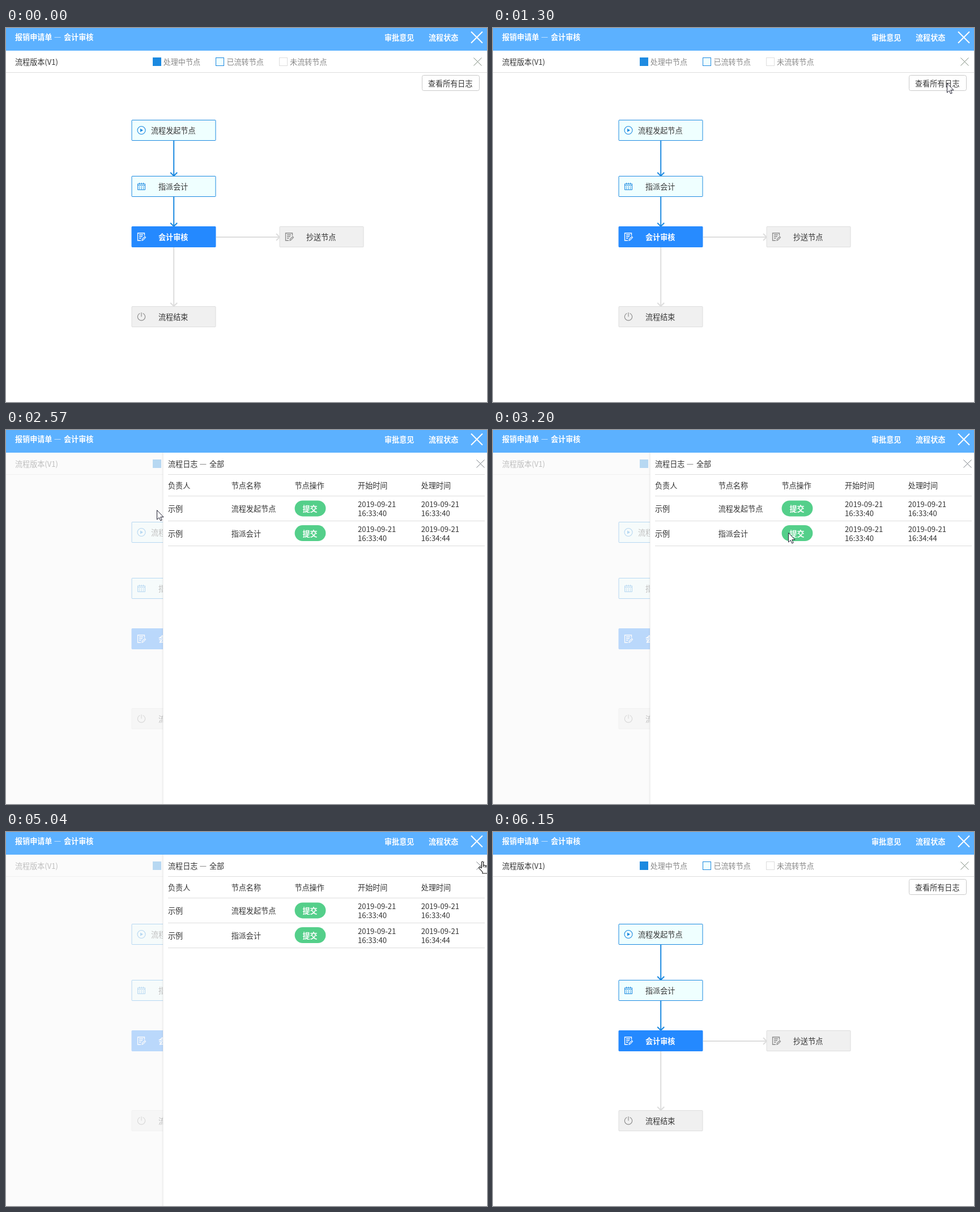
An HTML page for the animation above (6620 ms loop, 849 by 660 pixels).

```html
<!DOCTYPE html>
<html lang="zh">
<head>
<meta charset="utf-8">
<style>
html, body { margin: 0; width: 100%; height: 100%; overflow: hidden; background: #fff; }
svg { display: block; width: 849px; height: 660px; }
text { font: 13.1px "Noto Sans CJK SC", "Noto Sans CJK", sans-serif; white-space: pre; }
</style>
</head>
<body>
<svg id="stage" viewBox="0 0 849 660" fill="none"></svg>
<script>
const LOOP = 6620, OPEN_X = 277, TRAVEL = 572, COL = 111.7;
const BLUE = '#1b89e0', GREY = '#ddd', INK = '#333';
const stage = document.getElementById('stage');

function add(parent, tag, attrs, content) {
  const el = document.createElementNS('http://www.w3.org/2000/svg', tag);
  for (const k in attrs) el.setAttribute(k, attrs[k]);
  if (content) el.textContent = content;
  parent.appendChild(el);
  return el;
}
const group = (p, attrs = {}) => add(p, 'g', attrs);
const rect = (p, x, y, width, height, attrs) => add(p, 'rect', { x, y, width, height, ...attrs });
const path = (p, d, stroke, width = 1, more = {}) =>
  add(p, 'path', { d, stroke, 'stroke-width': width, ...more });
// cy is the vertical middle of the glyphs; white text is bold
const label = (p, x, cy, s, fill = INK) =>
  add(p, 'text', { x, y: cy + 5, fill, style: `font-weight:${fill === '#fff' ? 700 : 400}` }, s);
const cross = (p, x, y, r, stroke, width) =>
  path(p, `M${x - r} ${y - r}l${2 * r} ${2 * r}m0 ${-2 * r}l${-2 * r} ${2 * r}`, stroke, width);

const icons = {
  play(g, c) {
    add(g, 'circle', { r: 7, stroke: c, 'stroke-width': 1.1 });
    add(g, 'path', { d: 'M-2 -3L3 0L-2 3Z', fill: c });
  },
  calendar(g, c) {
    path(g, 'M-6.5 -4.5H6.5V6H-6.5ZM-6.5 -2H6.5M-3.5 -6.5V-3.5M0 -6.5V-3.5M3.5 -6.5V-3.5', c);
    path(g, 'M-4.5 1H5M-4.5 4H5', c, 1.5, { 'stroke-dasharray': '1.7 1.9' });
  },
  edit(g, c) {
    path(g, 'M5.5 -2V-6.5H-6.5V6.5H-1M-4 -3.5H3M-4 -.5H2M-4 2.5H-.5', c, 1.3);
    path(g, 'M1 6.5L1.5 4L6 -.5L7.5 1L3 5.8Z', c, 1.2);
  },
  power(g, c) {
    path(g, 'M-2.6 -6A6.6 6.6 0 1 0 2.6 -6M0 -7.5V0', c, 1.1);
  }
};

const kinds = {
  done: { fill: '#efffff', stroke: BLUE, icon: BLUE, ink: INK },
  active: { fill: '#2489ff', stroke: '#2489ff', icon: '#fff', ink: '#fff' },
  idle: { fill: '#f0f0f0', stroke: GREY, icon: '#888', ink: INK }
};

function node(x, y, kind, icon, tx, s) {
  const k = kinds[kind];
  rect(base, x + 1, y + .5, 148, 36, { rx: 1, fill: k.fill, stroke: k.stroke });
  icons[icon](group(base, { transform: `translate(${x + 18} ${y + 18.5})` }), k.icon);
  label(base, x + tx, y + 19, s, k.ink);
}
const downArrow = (y1, y2, c) => path(base, `M296.2 ${y1}V${y2 - 1}m-6 -5l6 6l6 -6`, c, 2);

// Flow chart page
const base = group(stage);
label(base, 16, 60, '流程版本(V1)');
rect(base, 259, 52, 15, 15, { fill: BLUE });
rect(base, 370.5, 52.5, 14, 14, { fill: '#efffff', stroke: BLUE });
rect(base, 482.5, 52.5, 14, 14, { stroke: GREY });
['处理中节点', '已流转节点', '未流转节点'].forEach((s, i) => label(base, 277.7 + i * COL, 60, s, '#888'));
cross(base, 832.5, 59.5, 7, '#7c8a7c', 1);
path(base, 'M0 78.5H849', GREY);
rect(base, 734.5, 83.5, 101, 27, { rx: 3, fill: '#fff', stroke: '#c8c8c8' });
label(base, 745, 98, '查看所有日志');
downArrow(199, 261, BLUE);
downArrow(298, 350, BLUE);
downArrow(387, 491, GREY);
path(base, 'M371 369H482M477 363l6 6l-6 6', GREY, 2);
node(221, 162, 'done', 'play', 35, '流程发起节点');
node(221, 261, 'done', 'calendar', 48, '指派会计');
node(221, 350, 'active', 'edit', 48, '会计审核');
node(482, 350, 'idle', 'edit', 48, '抄送节点');
node(221, 491, 'idle', 'power', 48, '流程结束');

const mask = rect(stage, 0, 40, 849, 620, { fill: '#fafafa' });

// Log drawer
const panel = group(stage);
rect(panel, -2, 40, 2, 620, { fill: '#000', opacity: .03 });
rect(panel, 0, 40, TRAVEL, 620, { fill: '#fff' });
rect(panel, 0, 40, 1, 620, { fill: '#000', opacity: .06 });
label(panel, 9, 60, '流程日志 —');
label(panel, 82, 60, '全部');
cross(panel, 560.5, 59.5, 7, '#7c8288', 1);
[78.5, 116.5, 160.5, 204.5].forEach(y => path(panel, `M9 ${y}H568`, GREY));
['负责人', '节点名称', '节点操作', '开始时间', '处理时间'].forEach((s, i) => label(panel, 9 + i * COL, 98, s));
[[139, '流程发起节点', '16:33:40'], [182.7, '指派会计', '16:34:44']].forEach(([y, name, end]) => {
  label(panel, 9, y, '示例');
  label(panel, 9 + COL, y, name);
  rect(panel, 232.6, y - 14.6, 54.8, 28, { rx: 14, fill: '#54cf8a' });
  label(panel, 246.5, y - .2, '提交', '#fff');
  ['16:33:40', end].forEach((time, i) => {
    label(panel, 9 + (3 + i) * COL, y - 8.2, '2019-09-21');
    label(panel, 9 + (3 + i) * COL, y + 8.3, time);
  });
});

// Title bar
rect(stage, 0, 0, 849, 40, { fill: '#5cb1ff' });
label(stage, 16, 16, '报销申请单 —', '#fff');
label(stage, 102, 16, '会计审核', '#fff');
label(stage, 668, 17, '审批意见', '#fff');
label(stage, 746, 17, '流程状态', '#fff');
cross(stage, 831, 16.5, 10, '#fff', 2);

// Pointers, each with its hot spot at 0,0
const cursor = group(stage);
const shapes = { arrow: group(cursor), beam: group(cursor), hand: group(cursor) };
path(shapes.arrow, 'M.5 -.5V16L4.3 12.6L6.8 18L9.2 17L6.8 11.6H12Z', '#223', 1, { fill: '#fff' });
path(shapes.beam, 'M-3.5 -7.5H-1L0 -6.5L1 -7.5H3.5M0 -6.5V6.5M-3.5 7.5H-1L0 6.5L1 7.5H3.5', '#222');
path(shapes.hand,
  'M-1.5 11V1.5Q-1.5 0 0 0T1.5 1.5V7Q4.5 5.5 4.8 8Q7.5 6.8 8 9Q11 8.3 11 11V15L9 18V21H0V18.5L-6 12Q-6.5 9.5 -4 9.8L-1.5 12M1.5 7V10M4.8 8V11M8 9V11.5',
  '#111', 1.1, { fill: '#fff' });

// Bursts of change as [first, last, steps]; the picture holds between steps
const bursts = [
  [230, 870, 9], [950, 1540, 8], [1620, 1690, 2], [2090, 2570, 7], [2730, 3360, 9],
  [3440, 3840, 6], [4640, 5040, 6], [5280, 5910, 9], [5990, 6150, 3]
];
function held(t) {
  let out = 0;
  for (const [a, b, n] of bursts) {
    if (t < a) break;
    const step = (b - a) / (n - 1);
    out = a + Math.min(n - 1, Math.floor((t - a) / step + 1e-6)) * step;
  }
  return out;
}

// Pointer stops as [time, x, y]
const stops = [
  [230, 750, 606], [790, 789, 123], [870, 792, 106], [1190, 801, 98], [2010, 801, 98],
  [2570, 266, 142], [2650, 266, 142], [3360, 610, 196], [3840, 774, 209], [4560, 774, 209],
  [5040, 841, 52], [5560, 839, 56], [5910, 806, 572], [6070, 800, 625], [6150, 798, 650]
];
function pointer(t) {
  let i = 0;
  while (i < stops.length - 2 && t >= stops[i + 1][0]) i++;
  const [t0, x0, y0] = stops[i], [t1, x1, y1] = stops[i + 1];
  const u = Math.min(1, Math.max(0, (t - t0) / (t1 - t0))), e = u * u * (3 - 2 * u);
  return [x0 + (x1 - x0) * e, y0 + (y1 - y0) * e];
}

function ease(u) {
  u = Math.min(1, Math.max(0, u));
  return u < .5 ? 4 * u ** 3 : 1 - 4 * (1 - u) ** 3;
}
// 0 while the drawer is shut, 1 while it is open
const shown = (t, duration) => ease((t - 1233) / duration) - ease((t - 5350) / duration);

function overText(x, y) {
  if (x < 9) return false;
  const col = Math.floor((x - 9) / COL), off = (x - 9) % COL;
  if (Math.abs(y - 98) < 9) return off < (col ? 52 : 39);
  const row = [139, 183].findIndex(c => Math.abs(y - c) < (col > 2 ? 16 : 9));
  return row >= 0 && off < [26, row ? 52 : 79, 0, 67, 67][col];
}

function pose(x, y, px, open) {
  const near = cx => Math.abs(x - cx) < 11 && Math.abs(y - 58) < 11;
  if (open > 0 && x >= px) {
    if (near(px + 560)) return 'hand';
    return overText(x - px, y) ? 'beam' : 'arrow';
  }
  if (open > 0) return 'arrow';
  const onButton = x > 734 && x < 836 && y > 83 && y < 111;
  return onButton || near(832) ? 'hand' : 'arrow';
}

function draw(time) {
  const t = held(time);
  const open = shown(t, 400);
  const px = OPEN_X + TRAVEL * (1 - open);
  mask.setAttribute('opacity', .7 * shown(t, 300));
  panel.setAttribute('opacity', open);
  panel.setAttribute('transform', `translate(${px} 0)`);
  const [x, y] = pointer(t), kind = pose(x, y, px, open);
  cursor.setAttribute('transform', `translate(${Math.round(x)} ${Math.round(y)})`);
  cursor.setAttribute('display', t >= 230 && t < 6149 ? 'inline' : 'none');
  for (const k in shapes) shapes[k].setAttribute('display', k === kind ? 'inline' : 'none');
}

const start = performance.now();
function frame() {
  draw((performance.now() - start) % LOOP);
  requestAnimationFrame(frame);
}
frame();
</script>
</body>
</html>
```
